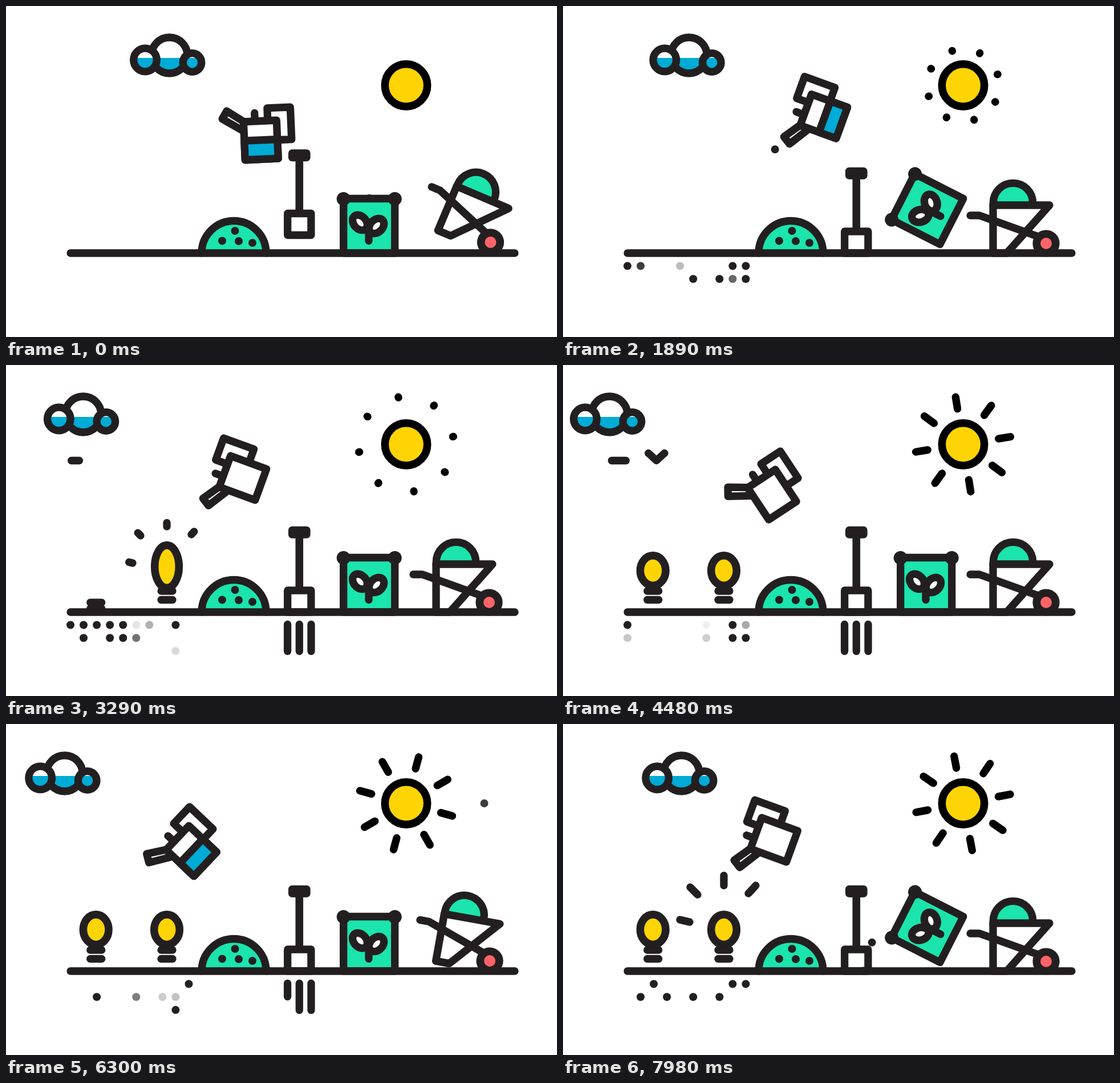
An HTML page with a canvas for the animation above (8000 ms loop, 966 by 580 pixels).

```html
<!DOCTYPE html>
<html lang="en">
<head>
<meta charset="utf-8">
<title>Garden</title>
<style>
  html, body { margin: 0; width: 100%; height: 100%; overflow: hidden; background: #fff; }
  canvas { display: block; }
</style>
</head>
<body>
<canvas id="stage" width="966" height="580"></canvas>
<script>
const ctx = document.getElementById('stage').getContext('2d');
const INK = '#231f20', GREEN = '#1be4ad', BLUE = '#00abd6', YELLOW = '#ffd405', PINK = '#ff6469';
const LOOP = 8000, WORK_CYCLE = 6500, TAU = Math.PI * 2;

const clamp = v => Math.min(1, Math.max(0, v));
const mix = (a, b, p) => a + (b - a) * p;
const ramp = (from, to, t) => clamp((t - from) / (to - from));
const smooth = (from, to, t) => { const p = ramp(from, to, t); return p * p * (3 - 2 * p); };
const random = n => { const s = Math.sin(n * 127.1 + 3.7) * 43758.5453; return s - Math.floor(s); };

function paint(fill, stroke = INK, width = 13.3) {
  if (fill) { ctx.fillStyle = fill; ctx.fill(); }
  if (stroke) { ctx.strokeStyle = stroke; ctx.lineWidth = width; ctx.stroke(); }
}
function line(points, { fill, stroke, width, close } = {}) {
  ctx.beginPath();
  points.forEach(([x, y]) => ctx.lineTo(x, y));
  if (close) ctx.closePath();
  paint(fill, stroke, width);
}
function box(x1, y1, x2, y2, fill) {
  line([[x1, y1], [x2, y1], [x2, y2], [x1, y2]], { fill, close: true });
}
function oval(x, y, rx, ry, fill, { angle = 0, stroke, width } = {}) {
  ctx.beginPath();
  ctx.ellipse(x, y, rx, ry, angle, 0, TAU);
  paint(fill, stroke, width);
}
function dot(x, y, alpha = 1, r = 7) {
  ctx.globalAlpha = alpha;
  oval(x, y, r, r, INK, { stroke: null });
  ctx.globalAlpha = 1;
}
function placed(x, y, degrees, draw) {
  ctx.save();
  ctx.translate(x, y);
  ctx.rotate(degrees * Math.PI / 180);
  draw();
  ctx.restore();
}

function cloud(t) {
  const x = mix(286.5, 71.5, smooth(0, 5150, t) - smooth(5150, 9950, t));
  for (const [dx, y, r] of [[0, 86.5, 31.5], [-42.5, 94.5, 20.3], [40, 99, 16.3]]) {
    oval(x + dx, y, r, r, '#fff', { stroke: null });
    ctx.save();
    ctx.clip();
    ctx.fillStyle = BLUE;
    ctx.fillRect(x + dx - r, 91, 2 * r, 50);
    ctx.restore();
    oval(x + dx, y, r, r, null);
  }
}

function sun(t) {
  const phase = (t + 1530) % 1700;
  const inner = mix(63, 84, smooth(1050, 1480, phase));
  const outer = mix(63.5, 84, smooth(0, 480, phase));
  if (t > 170 && phase < 1480)
    for (let i = 0; i < 8; i++)
      placed(701.5, 139, 0.4 + t * 0.03806 + i * 45, () =>
        line([[0, -inner], [0, -outer]], { stroke: '#000' }));
  oval(701.5, 139, 37.2, 37.2, YELLOW, { stroke: '#000', width: 13.6 });
}

function wind(t) {
  for (const start of [610, 2525, 4320, 6330]) {
    const age = t - start;
    if (age < 0 || age > 900) continue;
    placed(age * 0.03, 0, 0, () => {
      const head = smooth(0, 140, age), tail = smooth(650, 900, age);
      line([[mix(80.5, 105.5, tail), 167.5], [mix(80.5, 105.5, head), 167.5]]);

      // the zigzag opens from its middle and closes again
      const reach = 2 * Math.min(smooth(20, 300, age), 1 - smooth(480, 650, age));
      const elbow = Math.min(1, reach);
      if (reach > 0)
        line([-reach, -elbow, 0, elbow, reach].map(u =>
          [159 + u * 14, 154.5 + 13 * Math.abs(1 - Math.abs(u))]));
    });
  }
}

function canPose(t) {
  const pour = smooth(950, 1430, t) - smooth(3560, 5400, t) + smooth(5800, 6606, t);
  const path = [[0, 446.8], [910, 443.4], [1890, 457.3], [3290, 415.3], [4480, 366.5], [6300, 325], [7980, 370]];
  const next = Math.max(1, path.findIndex(([time]) => time >= t));
  const [[t0, x0], [t1, x1]] = [path[next - 1], path[next]];
  const x = mix(x0, x1, (t - t0) / (t1 - t0));
  return {
    x,
    y: 235 + pour * pour * ((415 - x) * 0.11 - 37),
    angle: mix(mix(-2.5, 3, smooth(0, 910, t)), -70, pour),
  };
}

function wateringCan(t) {
  const { x, y, angle } = canPose(Math.min(t, 7980));
  const water = 1 - smooth(1700, 3150, t) + smooth(4900, 5700, t) - smooth(6750, 7850, t);
  placed(x, y, angle, () => {
    line([[13.5, -33], [13.5, -55.5], [54, -55.5], [54, 1], [29, 1]]);
    line([[-9, -48], [-9, -34]]);
    line([[-29, -34], [-57.5, -53.5], [-66, -40], [-31, -18]], { fill: '#fff' });
    box(-29, -33.5, 29, 33.5, '#fff');
    if (water > 0.01) box(-29, mix(33.5, 0, water), 29, 33.5, BLUE);
  });
}

function drops(t) {
  for (const first of [1382, 6700])
    for (let i = 0; i < 3; i++) {
      const start = first + i * 400, u = (t - start) / 400;
      if (u < 0 || u > 1) continue;
      const { x, y } = canPose(start);
      dot(x - 65 - 70 * u, y + 42 + 10 * u + 175 * u * u);
    }
}

// damp specks fade in and out, each in its own rhythm
function soil(t) {
  const wet = smooth(1450, 1800, t);
  for (let n = 0; n < 21; n++) {
    const column = n < 20 ? n % 10 : 8, row = Math.floor(n / 10);
    const period = mix(1200, 2600, random(n));
    const level = clamp(2 * Math.sin(TAU * (t / period + random(n + 50))) - 0.3);
    if (wet * level > 0) dot(113 + 23.05 * column, 455.5 + 22.8 * row, wet * level);
  }
  const blink = Math.cos(TAU * (t - 6300) / 700);
  if (t > 1750 && t < 6720 && blink > 0) dot(838.5, 139, 0.87 * blink);
}

function flower(x, age) {
  if (age < 0) return;
  for (const [delay, y] of [[0, 411.5], [110, 396]]) {
    const barY = mix(433, y, smooth(delay, delay + 250, age));
    line([[x - 10, barY], [x + 10, barY]]);
  }
  const grow = smooth(300, 640, age), settle = smooth(640, 850, age);
  const ry = 37.3 * grow - 11 * settle;
  if (grow > 0) oval(x, 377 - 0.64 * ry, 21.3 * grow + settle, ry, YELLOW, { width: 13.6 });
}

function burst(t) {
  const rays = [[282, 283, 282, 265.5], [236, 299, 223, 286], [325, 297, 338, 283], [222, 347, 205, 343]];
  for (const start of [3200, 7680]) {
    const age = t - start;
    if (age < 0 || age > 620) continue;
    const ends = [smooth(350, 620, age), smooth(0, 220, age)];
    for (const [x1, y1, x2, y2] of rays) line(ends.map(p => [mix(x1, x2, p), mix(y1, y2, p)]));
  }
}

function mound() {
  ctx.beginPath();
  ctx.arc(399.5, 433, 56.5, Math.PI, 0);
  paint(GREEN);
  for (const [x, y] of [[379, 411.5], [401.5, 394], [408, 412], [432, 415]]) dot(x, y);
}

function shovel(t) {
  const depth = smooth(1100, 1350, t) - smooth(6550, 6850, t) + smooth(7500, 7750, t);
  placed(514.3, 31.5 * depth, 0, () => {
    line([[0, 262], [0, 358]], { width: 13.6 });
    box(-12.7, 258, 12.7, 265.5, INK);
    box(-20.6, 363.5, 20.6, 401.5, '#fff');
  });
  for (let i = 0; i < 3; i++) {
    const x = 493.6 + 20.7 * i;
    const length = smooth(2450 + i * 120, 2800 + i * 120, t) - smooth(6150 + i * 160, 6450 + i * 160, t);
    if (length > 0) line([[x, 454.5], [x, 454.5 + 47 * length]]);
  }
}

// seeds rise into a pyramid, then fly one by one into the hole, lowest row first
function seeds(c) {
  const lift = smooth(-90, 600, c);
  let start = 1228;
  for (let row = 0; row < 3; row++)
    for (let i = 0; i <= row; i++, start -= 40) {
      const u = ramp(start, start + 300, c);
      const x = 637 + 23 * (i - row / 2), y = mix(340, 278.5 + 20.3 * row, lift);
      if (u < 1) dot(mix(x, 524, u), mix(y, 441, u ** 2.6));
    }
}

function bag(c) {
  const tip = smooth(1080, 1400, c) - smooth(2000, 2500, c);
  placed(636.7 + 2.3 * tip, 385.5 - 29.5 * tip, -63 * tip, () => {
    box(-45, -48, 45, 47.5, GREEN);
    dot(-45, -47.5, 1, 12);
    dot(45, -47.5, 1, 12);
    line([[-0.7, 8], [-0.7, 26]]);
    oval(-16.2, -6, 15, 11, '#fff', { angle: 0.84 });
    oval(12.8, 0, 15, 11, '#fff', { angle: -0.79 });
  });
}

function wheelbarrow(c) {
  const tilt = 1 - smooth(50, 880, c) + smooth(6130, 6500, c);
  placed(847 + 2.5 * tilt, 416 - 2 * tilt, 23 * tilt, () => {
    ctx.beginPath();
    ctx.moveTo(-93, -67);
    ctx.arc(-58, -71, 34.7, Math.PI, 0);
    ctx.lineTo(-23.3, -67);
    paint(GREEN);
    line([[-93, -67], [6, -67], [-69, 17], [-93, 17]], { fill: '#fff', close: true });
    line([[-133, -49], [-117, -49], [-14, -12]]);
    oval(0, 0, 16.8, 16.8, PINK, { width: 13.6 });
  });
}

function frame() {
  const t = performance.now() % LOOP, c = t % WORK_CYCLE;
  ctx.clearRect(0, 0, 966, 580);
  ctx.lineCap = ctx.lineJoin = 'round';
  cloud(t);
  sun(t);
  wind(t);
  soil(t);
  burst(t);
  flower(157.7, t - 3115);
  flower(282, t - 2650);
  mound();
  drops(t);
  wateringCan(t);
  shovel(t);
  seeds(c);
  bag(c);
  wheelbarrow(c);
  line([[113, 433], [892, 433]]);
  requestAnimationFrame(frame);
}
requestAnimationFrame(frame);
</script>
</body>
</html>
```
